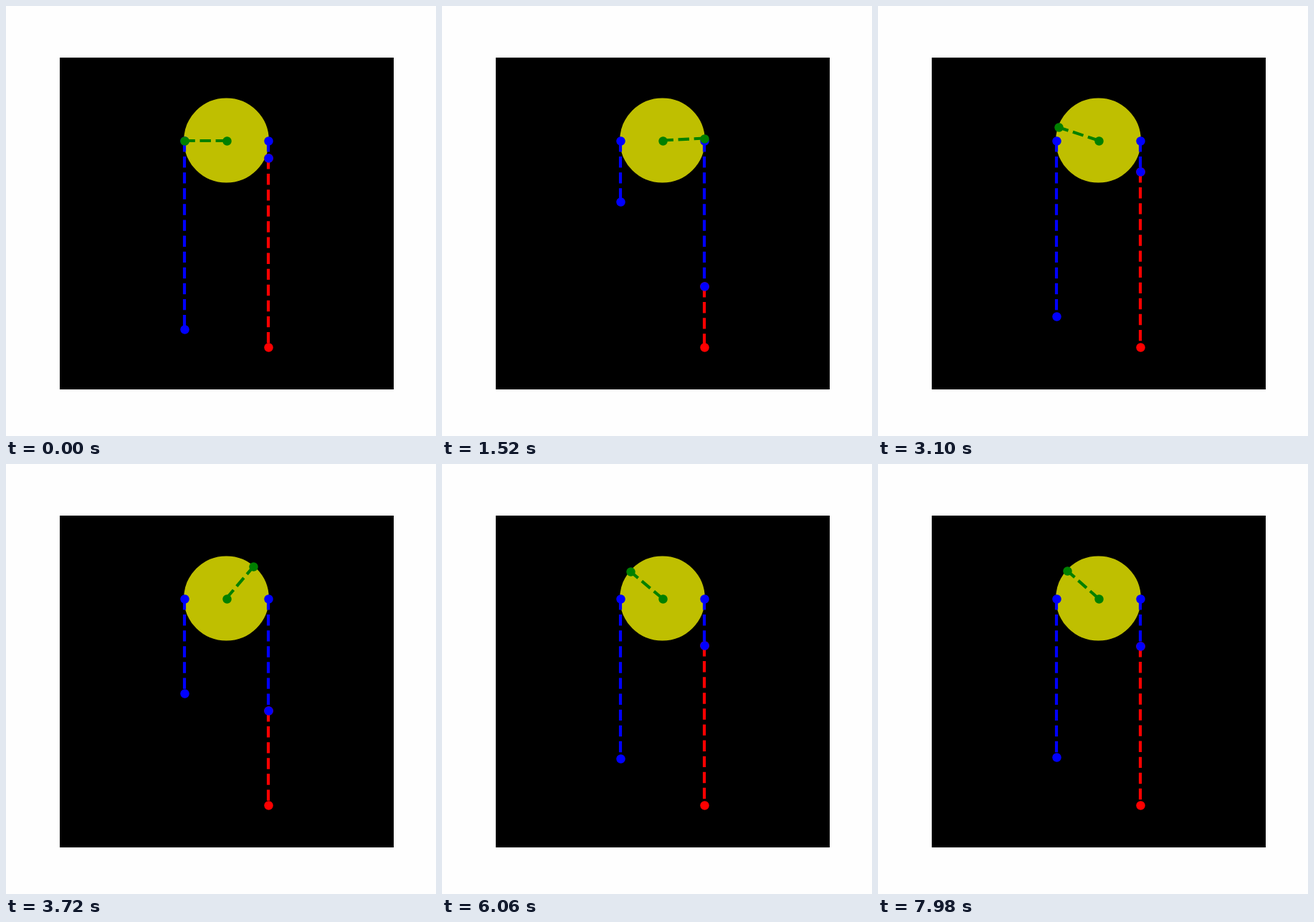
Recreate the animation shown at these times as an HTML page. Size 600x600 px, loop 8 s.

```html
<!DOCTYPE html>
<html lang="en">
<head>
<meta charset="utf-8">
<title>Pulley and spring</title>
<style>
html, body { margin: 0; width: 100%; height: 100%; overflow: hidden; background: #fefefe; }
svg { display: block; width: 100vw; height: 100vh; }
line { stroke-width: 4.17; stroke-dasharray: 15.42 6.67; }
</style>
</head>
<body>
<svg id="stage" viewBox="0 0 600 600">
  <rect x="75" y="72" width="466" height="463"/>
  <ellipse cx="307.5" cy="187.5" rx="58.125" ry="57.75" fill="#bfbf00" stroke="#bfbf00" stroke-width="2.4"/>
</svg>
<script>
const LOOP = 8000, STEP = 20;
const UX = 116.25, UY = 115.5;          // pixels per unit
const CX = 307.5, CY = 187.5, R = 0.5;  // pulley
const OMEGA = Math.sqrt(5), AMP = Math.PI / 4;
const LEFT = CX - R * UX, RIGHT = CX + R * UX, FLOOR = CY + 2.5 * UY;

const stage = document.getElementById('stage');
const snap = v => Math.floor(v + 0.5);

function add(tag, attrs) {
  const el = document.createElementNS('http://www.w3.org/2000/svg', tag);
  set(el, attrs);
  return stage.appendChild(el);
}

function set(el, attrs) {
  for (const k in attrs) el.setAttribute(k, attrs[k]);
}

// Dashed line with a dot at each end; dots sit on whole pixels.
function link(color) {
  const line = add('line', { stroke: color });
  const dots = [0, 1].map(() => add('circle', { r: 6.25, fill: color }));
  return (x1, y1, x2, y2) => {
    const straight = x1 === x2 || Math.abs(y1 - y2) < 1e-4;
    const fit = straight ? snap : v => v;
    set(line, { x1: fit(x1), y1: fit(y1), x2: fit(x2), y2: fit(y2) });
    set(dots[0], { cx: snap(x1) + 0.5, cy: snap(y1) + 0.5 });
    set(dots[1], { cx: snap(x2) + 0.5, cy: snap(y2) + 0.5 });
  };
}

const spring = link('#ff0000');
const ropeRight = link('#0000ff');
const ropeLeft = link('#0000ff');
const spoke = link('#008000');

function draw(ms) {
  const s = AMP * Math.cos(OMEGA * ms / 1000);
  const mass = CY + (1 - s) * UY;
  const angle = Math.PI / 2 + s / R;
  spring(RIGHT, mass, RIGHT, FLOOR);
  ropeRight(RIGHT, CY, RIGHT, mass);
  ropeLeft(LEFT, CY, LEFT, CY + (1.5 + s) * UY);
  spoke(CX, CY, CX + R * UX * Math.cos(angle), CY - R * UY * Math.sin(angle));
}

const start = performance.now();
function tick() {
  const t = Math.max(0, performance.now() - start) % LOOP;
  draw(Math.floor(t / STEP) * STEP);
  requestAnimationFrame(tick);
}
draw(0);
requestAnimationFrame(tick);
</script>
</body>
</html>
```
